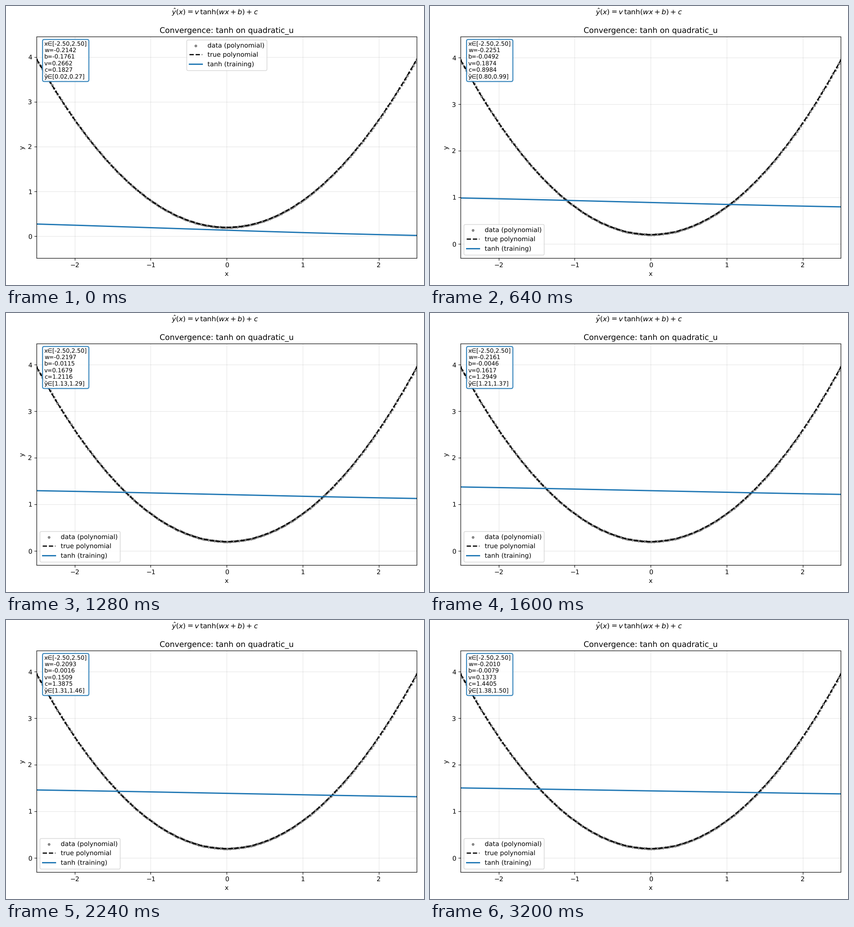
These frames come from a looping animation (917x611 px, 3.28 s). A matplotlib script:

```python
import numpy as np
import matplotlib.pyplot as plt
from matplotlib.animation import FuncAnimation

W, H = 917, 611
DPI = W / 9
FRAMES, INTERVAL = 41, 80
STEPS, LR = 25, 0.002
BLUE = "#1f77b4"

plt.rcParams["text.hinting"] = "none"

x = np.linspace(-2.5, 2.5, 200)
y = 0.6 * x**2 + 0.2


def predict(p):
    w, b, v, c = p
    return v * np.tanh(w * x + b) + c


def descend(p):
    """One full-batch gradient step on the mean squared error."""
    w, b, v, c = p
    t = np.tanh(w * x + b)
    err = v * t + c - y
    back = err * v * (1 - t**2)
    grad = [np.mean(back * x), back.mean(), np.mean(err * t), err.mean()]
    return p - 2 * LR * np.array(grad)


def train(p):
    history = [p]
    for _ in range(FRAMES - 1):
        for _ in range(STEPS):
            p = descend(p)
        history.append(p)
    return history


history = train(np.array([-0.2142, -0.1761, 0.2662, 0.1827]))

fig = plt.figure(figsize=(9, (H + 0.001) / DPI), dpi=DPI, facecolor="white")
left, right, top, bottom = 67.3, 901.2, 67.4, 551.6
ax = fig.add_axes([left / W, 1 - bottom / H, (right - left) / W, (bottom - top) / H])

fig.suptitle(r"$\hat{y}(x) = v\,\tanh(wx+b)+c$", fontsize=11, y=0.997)
ax.set_title("Convergence: tanh on quadratic_u")
ax.set_xlabel("x")
ax.set_ylabel("y")
ax.set_xlim(-2.5, 2.5)
ax.grid(True, alpha=0.3)

ax.scatter(x, y, s=10, color="black", alpha=0.4, label="data (polynomial)")
ax.plot(x, y, "k--", lw=1.8, label="true polynomial")
fit, = ax.plot(x, predict(history[0]), color=BLUE, lw=2, label="tanh (training)")
info = ax.text(
    0.02, 0.98, "", transform=ax.transAxes, va="top", ha="left",
    fontsize=9, linespacing=1.17,
    bbox=dict(boxstyle="round,pad=0.3", facecolor="white",
              edgecolor=BLUE, linewidth=1.5, alpha=0.9))
ax.legend(loc="best")  # placed anew on every draw


def update(i):
    p = history[i]
    yhat = predict(p)
    fit.set_ydata(yhat)
    ax.set_ylim(min(y.min(), yhat.min()) - 0.5, max(y.max(), yhat.max()) + 0.5)
    lines = [f"x∈[{x[0]:.2f},{x[-1]:.2f}]"]
    lines += [f"{name}={value:.4f}" for name, value in zip("wbvc", p)]
    lines.append(f"ŷ∈[{yhat.min():.2f},{yhat.max():.2f}]")
    info.set_text("\n".join(lines))
    return fit, info


anim = FuncAnimation(fig, update, frames=FRAMES, interval=INTERVAL,
                     repeat=True, repeat_delay=0, blit=False)
plt.show()
```
